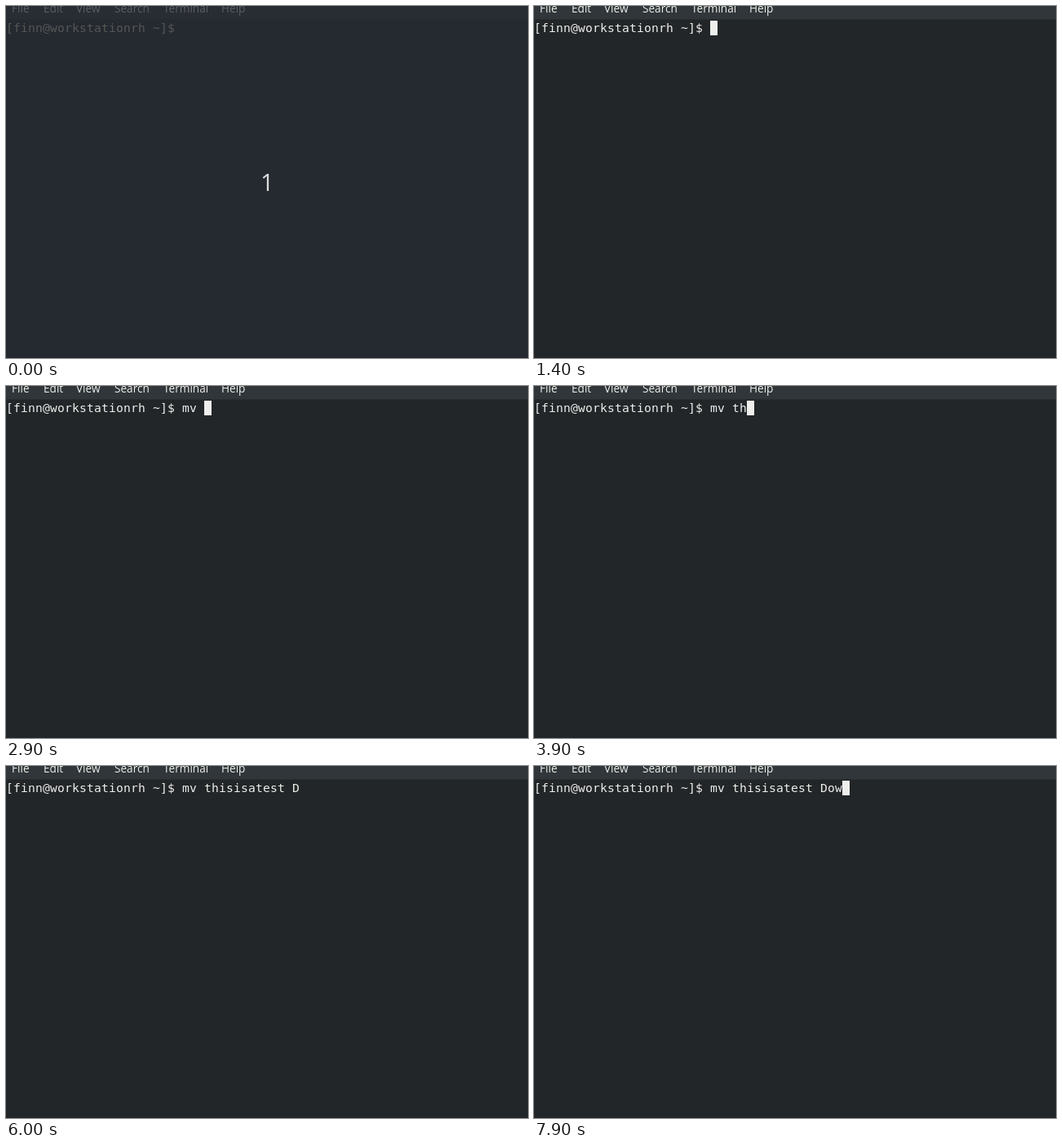
Write an HTML page with a canvas that moves like this. It is 640x432 px and loops after 8000 ms.

```html
<!DOCTYPE html>
<html lang="en">
<meta charset="utf-8">
<title>Terminal</title>
<style>
  html, body { margin: 0; height: 100%; overflow: hidden; background: #222628; }
  canvas { display: block; }
</style>
<canvas id="stage" width="640" height="432"></canvas>
<script>
const ctx = document.getElementById('stage').getContext('2d');
const LOOP = 8000, CELL = 9;
const PROMPT = '[finn@workstationrh ~]$ ';
const MENU = [['File', 7], ['Edit', 46], ['View', 86], ['Search', 133], ['Terminal', 193], ['Help', 264]];

// [time, command typed so far, cursor visible]
const STEPS = [
  [200, '', 1], [800, '', 0], [1400, '', 1], [2000, '', 0], [2600, '', 1],
  [2700, 'm', 1], [2800, 'mv', 1], [2900, 'mv ', 1], [3400, 'mv ', 0],
  [3600, 'mv t', 1], [3900, 'mv th', 1],
  [4000, 'mv thisisatest ', 1], [4500, 'mv thisisatest ', 0], [5100, 'mv thisisatest ', 1],
  [5500, 'mv thisisatest D', 1], [6000, 'mv thisisatest D', 0], [6600, 'mv thisisatest D', 1],
  [6800, 'mv thisisatest ', 1], [7500, 'mv thisisatest D', 1],
  [7800, 'mv thisisatest Do', 1], [7900, 'mv thisisatest Dow', 1]
];
const LIT = { back: '#222628', bar: '#303639', edge: '#292e30', menu: '#eeeeec', text: '#eeeeec' };
const DIM = { back: '#252930', bar: '#282c33', edge: '#262a31', menu: '#5b5e62', text: '#555856' };

function box(color, x, y, w, h) {
  ctx.fillStyle = color;
  ctx.fillRect(x, y, w, h);
}

function write(text, x, y, font, color) {
  ctx.font = font;
  ctx.fillStyle = color;
  ctx.fillText(text, x, y);
}

function draw(t) {
  const step = STEPS.findLast(s => s[0] <= t);
  const look = step ? LIT : DIM;
  box(look.back, 0, 0, 640, 432);
  box(look.bar, 0, 0, 640, 16);
  box(look.edge, 0, 16, 640, 1);
  for (const [label, x] of MENU)
    write(label, x, 8, '13.6px "Open Sans", "Noto Sans", sans-serif', look.menu);

  const line = PROMPT + (step ? step[1] : '');
  [...line].forEach((c, i) =>
    write(c, i * CELL, 32, '14.667px "DejaVu Sans Mono", monospace', look.text));

  if (!step) write('1', 312, 227, '29px "Open Sans", "Noto Sans", sans-serif', '#dcdcdc');
  else if (step[2]) box(LIT.text, line.length * CELL, 18, CELL, 18);
}

function tick() {
  draw(performance.now() % LOOP);
  requestAnimationFrame(tick);
}
tick();
</script>
</html>
```
